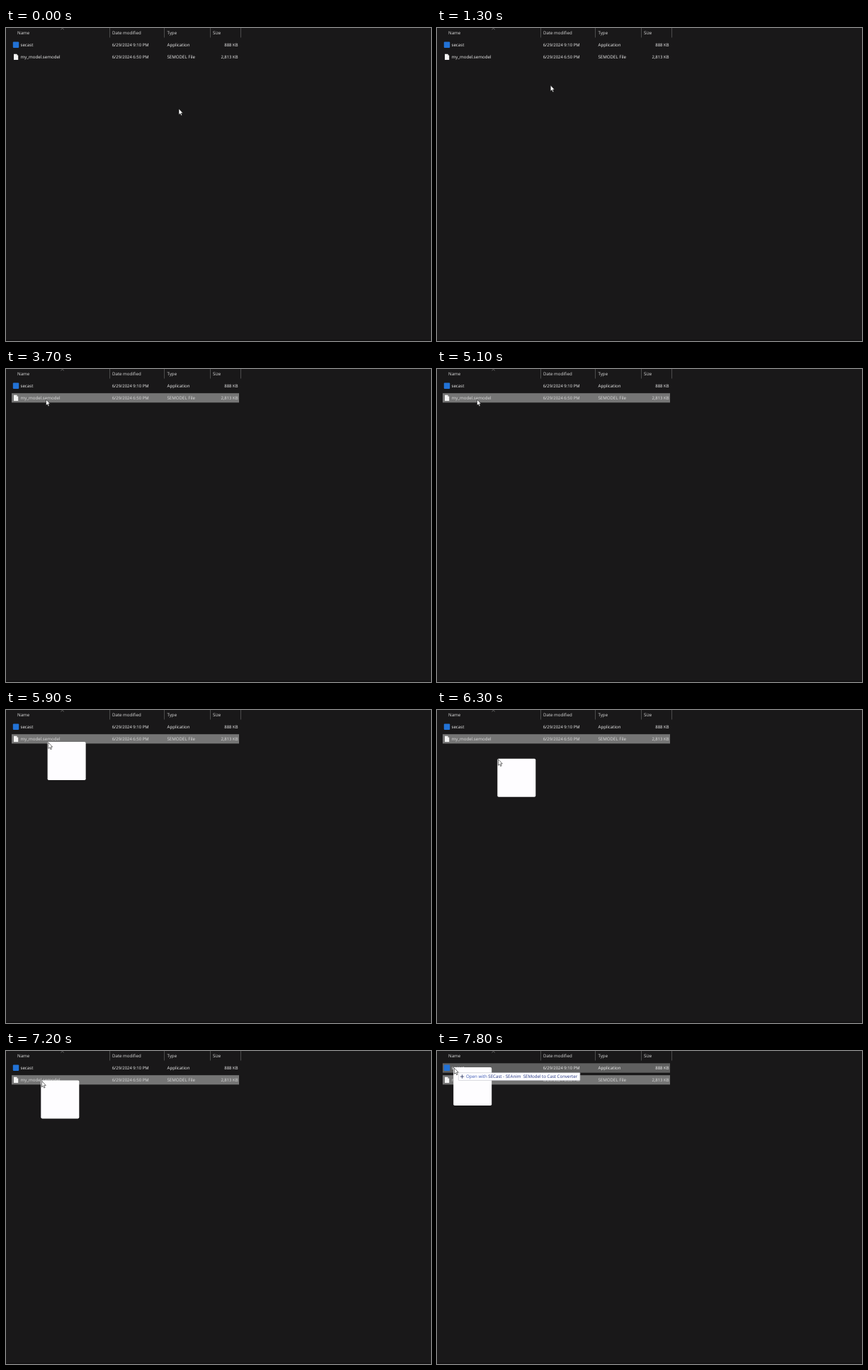
Animation, 600 px wide and 442 px high, one loop 8000 ms. Source, as an HTML page:

```html
<!DOCTYPE html>
<html lang="en">
<head>
<meta charset="utf-8">
<title>Drag a file onto a program</title>
<style>
  html, body { margin: 0; width: 100%; height: 100%; overflow: hidden; background: #191819; }
  svg { display: block; width: 100vw; height: 100vh; }
  text { font: 6.15px "Open Sans", "Noto Sans", sans-serif; fill: #f2f2f2; white-space: pre; text-rendering: geometricPrecision; }
  .head { fill: #dedede; }
  .date, .size { font-size: 5.95px; }
  .size { text-anchor: end; }
</style>
</head>
<body>
<svg viewBox="0 0 600 442">
  <rect width="600" height="442" fill="#191819"/>
  <rect y="440" width="600" height="2" fill="#131213"/>
  <path d="M146.5 0V13.5M223.5 0V13.5M288.5 0V13.5M331.5 0V13.5" stroke="#4b4b4b"/>
  <path d="M77.5 2.2L79.6 .4L81.7 2.2" fill="none" stroke="#8c8c8c" stroke-width=".7"/>
  <rect id="row1" x="8" y="17.3" width="321" height="13.4" fill="#606060"/>
  <rect id="row2" x="8" y="34.2" width="321" height="13.2"/>
  <g id="list"></g>
  <rect x="9.8" y="19.6" width="8.4" height="8.4" rx="1" fill="#2272d6"/>
  <path d="M11 36.8H15L17.2 39V45H11Z" fill="#f4f4f4"/>
  <path d="M15 36.8V39H17.2Z" fill="#b4b4b4"/>
  <g id="ghost">
    <rect width="54" height="54" rx="1.8" fill="#fefdff"/>
  </g>
  <g id="tip">
    <rect x=".3" y=".3" width="171.6" height="10.8" rx=".5" fill="#fdfdff" stroke="#c3c3cb" stroke-width=".6"/>
    <path d="M2.8 5.7H8.2M5.5 3V8.4" stroke="#26305e" stroke-width=".8"/>
    <text x="11" y="7.9" style="font-size:6.17px;fill:#20317f"><tspan fill="#3c58b4">Open with </tspan>SECast - SEAnim  SEModel to Cast Converter</text>
  </g>
  <path id="cursor" d="M0 0V8.5L1.9 6.8L3.2 9.7L4.6 9.1L3.3 6.2H5.8Z" fill="#fff" stroke="#111" stroke-width=".6"/>
</svg>
<script>
const LOOP = 8000, STEP = 100;
const PRESS = 3700, DRAG = 5900;
const $ = id => document.getElementById(id);
const [row1, row2, list, ghost, tip, cursor] =
  ["row1", "row2", "list", "ghost", "tip", "cursor"].map($);

const easeIn = p => p * p;
const easeOut = p => 1 - (1 - p) * (1 - p);
const linear = p => p;

// Pointer path: time, x, y, easing towards this point
const path = [
  [500, 244, 114],
  [1400, 138, 72, easeIn],
  [2300, 56.5, 43, easeOut],
  [5700, 56.5, 43],
  [6300, 86.5, 69.7, easeIn],
  [6500, 167, 82.5],
  [6600, 208, 81],
  [6800, 218, 70.6, easeOut],
  [7200, 50.5, 42.4],
  [7500, 27.5, 28, easeOut],
  [7700, 23.5, 23],
  [7800, 24.4, 24]
];

const columns = [["head", 16, 150, 227.5, 292], ["", 20.5, 149.7, 227.5, 327.5]];
const rows = [
  [9.2, "Name", "Date modified", "Type", "Size"],
  [26.2, "secast", "6/29/2024 9:10 PM", "Application", "888 KB"],
  [43.2, "my_model.semodel", "6/29/2024 6:50 PM", "SEMODEL File", "2,813 KB"]
];
const labels = rows.map(([y, ...cells], r) => {
  const [base, ...xs] = columns[r ? 1 : 0];
  return cells.map((cell, c) => {
    const el = document.createElementNS("http://www.w3.org/2000/svg", "text");
    el.setAttribute("x", xs[c]);
    el.setAttribute("y", y);
    el.setAttribute("class", r ? ["", "date", "", "size"][c] : base);
    el.textContent = cell;
    return list.appendChild(el);
  });
});

function pointer(t) {
  const i = path.findIndex(k => k[0] > t);
  if (i === 0) return path[0].slice(1, 3);
  if (i < 0) return path[path.length - 1].slice(1, 3);
  const [t0, x0, y0] = path[i - 1], [t1, x1, y1, ease = linear] = path[i];
  const p = ease((t - t0) / (t1 - t0));
  return [x0 + (x1 - x0) * p, y0 + (y1 - y0) * p];
}

const show = (el, on) => el.setAttribute("visibility", on ? "visible" : "hidden");
const move = (el, x, y) => el.setAttribute("transform", `translate(${x} ${y})`);

function draw(ms) {
  const t = Math.floor((ms % LOOP) / STEP) * STEP;
  const [x, y] = pointer(t);
  const selected = t >= PRESS, dragging = t >= DRAG;
  const overProgram = dragging && y < 30.7;

  show(row1, overProgram);
  show(row2, selected || (y > 34 && y < 47.5));
  row2.setAttribute("fill", selected ? "#757575" : "#4d4d4d");
  for (const el of labels[2]) el.style.fill = selected ? "#dcdcdc" : "";

  show(ghost, dragging);
  show(tip, overProgram);
  move(ghost, x - 1.2, y - 1);
  move(tip, x + 5.6, y + 6.4);
  move(cursor, x, y);
}

const start = performance.now();
function tick() {
  draw(performance.now() - start);
  requestAnimationFrame(tick);
}
draw(0);
requestAnimationFrame(tick);
</script>
</body>
</html>
```
